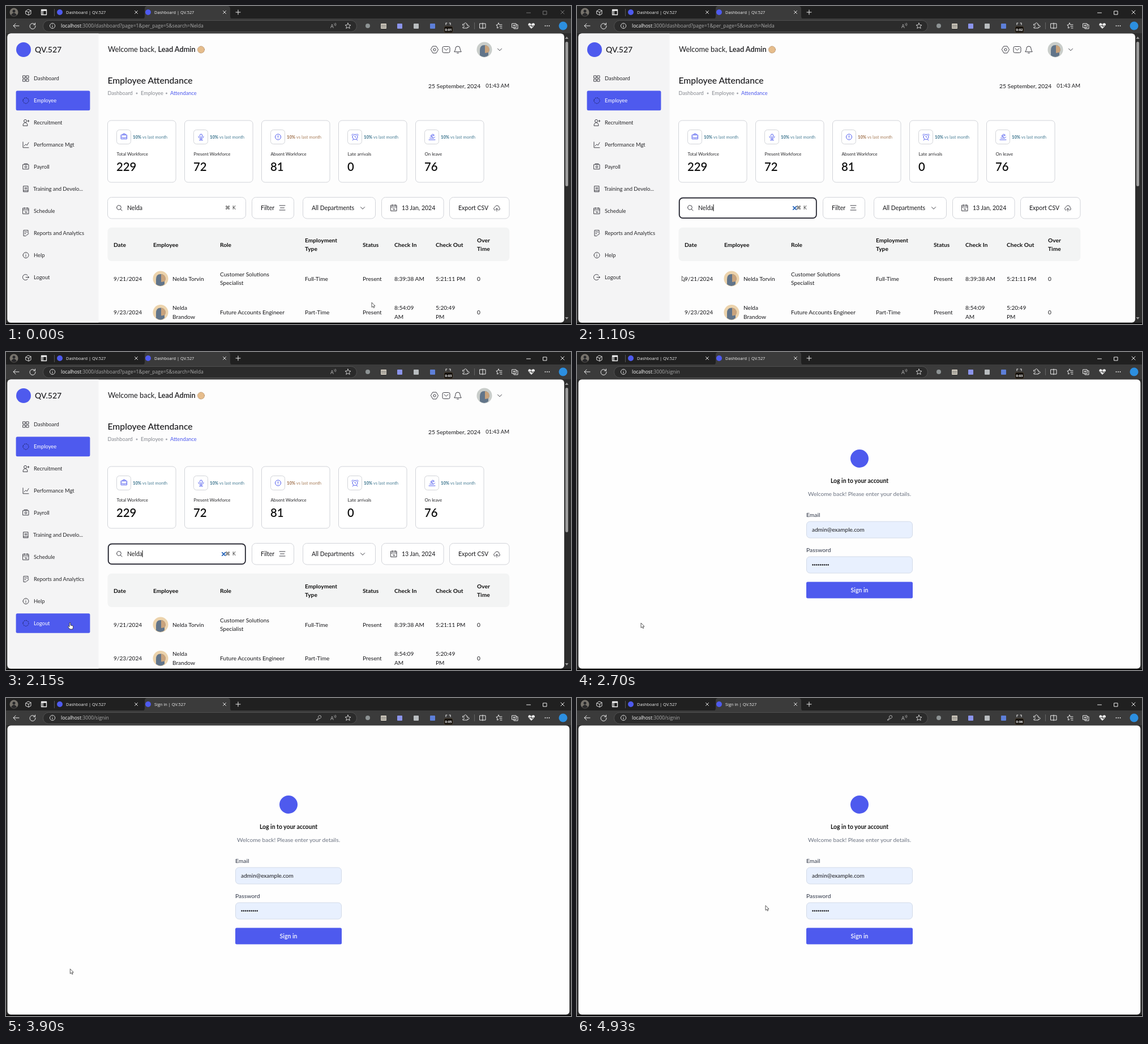
These frames come from a looping animation (998 by 561 pixels, 5.03 s). An HTML page:

```html
<!DOCTYPE html>
<html lang="en">
<head>
<meta charset="utf-8">
<title>Dashboard</title>
<style>
  html, body { margin: 0; width: 100%; height: 100%; overflow: hidden; background: #1c1c1c; }
  svg { display: block; width: 100vw; height: 100vh; font-family: Lato, Inter, sans-serif; }
  text { white-space: pre; }
  .ui { font-family: "Open Sans", "Noto Sans", sans-serif; }
</style>
</head>
<body>
<svg id="stage" viewBox="0 0 998 561"></svg>
<script>
const BLUE = '#4e5aee', INK = '#18181b', LINE = '#d2d4d9';
const LOOP = 5030;

// Drawing helpers: all return SVG markup.
const text = (x, y, s, size = 10.1, fill = INK, weight = 400, more = '') => {
  const lines = s.split('\n');
  return lines.map((line, i) =>
    `<text x="${x}" y="${y + size * .35 + (i - (lines.length - 1) / 2) * 15.5}" font-size="${size}" fill="${fill}" font-weight="${weight}" ${more}>${line}</text>`).join('');
};
const ui = (x, y, s, size, fill, more = '') => text(x, y, s, size, fill, 400, `class="ui" ${more}`);
const rect = (x, y, w, h, r, fill, stroke = 'none', more = '') =>
  `<rect x="${x}" y="${y}" width="${w}" height="${h}" rx="${r}" fill="${fill}" stroke="${stroke}" ${more}/>`;
const dot = (x, y, r, fill, more = '') => `<circle cx="${x}" cy="${y}" r="${r}" fill="${fill}" ${more}/>`;
const icon = (x, y, d, stroke = '#3f3f46', width = 1, more = '') =>
  `<path transform="translate(${x} ${y})" d="${d}" fill="none" stroke="${stroke}" stroke-width="${width}" stroke-linecap="round" stroke-linejoin="round" ${more}/>`;
const group = (id, body) => `<g id="${id}">${body}</g>`;

const ring = r => `M${-r} 0a${r} ${r} 0 1 0 ${2 * r} 0a${r} ${r} 0 1 0 ${-2 * r} 0`;
const box = (w, h = w) => `M${-w} ${-h}h${2 * w}v${2 * h}h${-2 * w}z`;
const CROSS = 'M-2.5 -2.5L2.5 2.5M2.5 -2.5L-2.5 2.5';
const CHEVRON = 'M-3.5 -1.8L0 1.8L3.5 -1.8';
const STAR = 'M0 -5L1.5 -1.6L5 -1.3L2.3 1L3.2 4.5L0 2.6L-3.2 4.5L-2.3 1L-5 -1.3L-1.5 -1.6z';
const CALENDAR = box(5) + 'M-5 -2H5M-2.5 -6v2M2.5 -6v2M-1.5 1h1v2M1.5 1v2';

// Browser frame
const tabText = 'Dashboard | QV.527';
const tab = (x, id) => dot(x + 5, 11, 5, BLUE) +
  ui(x + 16, 11, tabText, 7.4, '#f0f0f0', `id="${id}"`) + icon(x + 140, 11, CROSS, '#e4e4e4');

const chrome = rect(0, 0, 998, 561, 0, '#202020') +
  `<path d="M240 23q5 0 5-5V5q0-5 5-5h141q5 0 5 5v13q0 5 5 5z" fill="#3b3b3b"/>` +
  rect(0, 22, 998, 27, 0, '#3b3b3b') + rect(0, 48, 998, 511, 0, '#2c2c2c') + rect(0, 559, 998, 2, 0, '#050505') +
  dot(14, 11, 7.5, '#77736c') + dot(14, 9, 2.5, '#28282a') + `<path d="M9 16q5-8 10 0a7.5 7.5 0 0 1-10 0" fill="#28282a"/>` +
  icon(40, 11, 'M-5 -2L-1 -5L4 -3V3L0 5L-5 3zM-5 -2L0 0L4 -3M0 0V5', '#ddd') +
  icon(67, 11, box(4.5) + 'M-4.5 -3H4.5M-2 -3V4', '#eee', 1.3) +
  rect(85, 5, 1, 13, 0, '#555') + tab(90, 'tab1') + tab(246, 'tab2') +
  icon(410, 11, 'M-4 0H4M0 -4V4', '#eee') +
  group('controls', icon(923, 12, 'M-3.5 0H3.5', 'currentColor') + icon(952, 12, box(3), 'currentColor') +
    icon(983, 11, 'M-3 -3L3 3M3 -3L-3 3', 'currentColor')) +
  icon(18, 35, 'M5 0H-5L-1 -4M-5 0L-1 4', '#eee') +
  icon(47, 35, 'M3.5 -3A5 5 0 1 0 5 0M4.5 -5V-2H1.5', '#eee') +
  rect(65.5, 25.5, 554, 20, 10, '#2b2b2b', '#515151') +
  icon(82, 35, ring(4.6) + 'M0 0v2.5M0 -2.2v.2', '#ddd') +
  `<text class="ui" x="97" y="38.2" font-size="8.6" fill="#a9a9a9"><tspan fill="#fff">localhost</tspan><tspan id="path"></tspan></text>` +
  group('key', icon(552, 35, 'M0 0L-4 4H-2L1.4 1.2M-.5 -1a2.6 2.6 0 1 1 2 2', '#bbb')) +
  ui(573, 36, 'A', 9, '#bbb') + icon(580, 32, 'M0 -1q1 1 0 3M2 -2q2 2 0 5', '#bbb', .8) +
  icon(604, 35, STAR, '#ccc') +
  dot(639, 35, 4, '#8d9394') +
  rect(662, 31, 10, 9, 1, '#d8d2c5') + icon(667, 35, 'M-4 -1H4M-4 2H4', '#555') +
  rect(691, 31, 9, 9, 1, '#8b94ec') + rect(720, 31, 9, 9, 1, '#b9bdc0') + rect(749, 31, 9, 9, 1, '#5d7fd8') +
  icon(781, 34, 'M-4 -1V-4H-2M2 -4H4V-1', '#ddd', 1.2) + rect(774, 36, 15, 11, 2, '#15120f', '#5f5038', 'stroke-width=".6"') +
  text(781.5, 41.5, '', 6, '#fff', 700, 'id="timer" class="ui" text-anchor="middle"') +
  icon(811, 35, 'M-4 -3H-1a1.7 1.7 0 1 1 3 0H4V0a1.7 1.7 0 1 1 0 2V4H-4V2a1.7 1.7 0 1 0 0-3z', '#ddd') +
  rect(827, 29, 1, 12, 0, '#666') +
  icon(842, 35, box(5, 4) + 'M0 -5V5', '#eee') +
  icon(871, 35, 'M-1 -5L.5 -2H5M-1 -5L-2.3 -2L-5 -1.5L-3 1L-3.5 4L-1 3M1 1H5M2 4H5', '#eee') +
  icon(899, 35, 'M-5 -4H2V3H-5zM-2 3V5H5V-2H2M-1.5 -2V1M-3 -.5H0', '#eee') +
  `<path d="M928 40l-5-5q-2-4 2-5l3 2 3-2q5 1 2 5z" fill="#eee"/>` + icon(928, 35, 'M-5 0H-1L0 -2L1 2L2 0H5', '#333', .9) +
  [952.5, 956, 959.5].map(x => dot(x, 35, .9, '#eee')).join('') + dot(984, 35, 7.5, '#2c8fe0');

// Dashboard page
const menu = [
  ['Dashboard', 'M-5 -5h4v4h-4zM1 -5h4v4h-4zM-5 1h4v4h-4zM1 1h4v4h-4z'],
  ['Employee', ring(5) + ring(2)],
  ['Recruitment', 'M-5 5q0-5 4-5t4 5zM-3.5 -3a2.4 2.4 0 1 0 5 0a2.4 2.4 0 1 0-5 0M3 -3H6M4.5 -4.5V-1.5'],
  ['Performance Mgt', 'M-5 -5V5H5M-3 2L0 -1L2 1L5 -4'],
  ['Payroll', box(5, 4) + 'M-3 -5.5H3' + ring(1.7)],
  ['Training and Develo...', box(4, 5) + 'M-2 -2H2M-2 0H2M-4 3H4'],
  ['Schedule', CALENDAR],
  ['Reports and Analytics', 'M4 0V-5H-4V5H0M-2 -2H2M-2 1H0M1 4L5 1'],
  ['Help', ring(5) + 'M0 0V2.5M0 -2.3V-2'],
  ['Logout', 'M3 -3.5A5 5 0 1 0 3 3.5M0 0H5.5L4 -1.5M5.5 0L4 1.5']
];
const menuItem = ([label, d], i, active) => {
  const y = 128 + 38.95 * i;
  return (active ? rect(17.6, y - 17.4, 130.8, 34.7, 2.5, BLUE) : '') +
    icon(35, y, active ? ring(5) : d, active ? '#1b225e' : '#3f3f46', 1, active ? 'stroke-dasharray="1.5 2"' : '') +
    text(i === 5 ? 48 : 49, y, label, 9.4, active ? '#fff' : '#27272a');
};

const cards = [
  ['Total Workforce', 229, box(5, 3.5) + 'M-2 -3.5V-5.5H2V-3.5M-5 0Q0 3 5 0'],
  ['Present Workforce', 72, 'M-2 -3a2 2 0 1 1 4 0v2a2 2 0 1 1-4 0zM-4.5 -1Q-4 3 0 3T4.5 -1M0 3V5.5M-3 5.5H3'],
  ['Absent Workforce', 81, ring(5) + 'M0 -2.5V.5M0 2.4V2.5'],
  ['Late arrivals', 0, ring(4.5) + 'M0 -2V0L1.5 1M-6 -3L-3.5 -5.5M6 -3L3.5 -5.5M-3 4L-4 6M3 4L4 6'],
  ['On leave', 76, 'M-5.5 5H5.5M-4 2H3L5 0M-1 -1L2 2M-2 -2Q1 -7 4 -3L-2 -1z']
];
const card = ([label, value, d], i) => {
  const x = 180 + 136 * i, tint = i === 2 ? '#9a6840' : '#2d6a85';
  return rect(x - .5, 202, 120.5, 109, 6, '#fff', LINE) + rect(x + 15.5, 218.5, 25, 25, 5, '#fff', LINE) +
    icon(x + 28.5, 231, d, BLUE) +
    text(x + 44, 231, `<tspan font-weight="700">10%</tspan><tspan fill-opacity=".85"> vs last month</tspan>`, 7.6, tint) +
    text(x + 15.5, 261, label, 7.9, '#27272a') + text(x + 15, 283.5, String(value), 20.3, '#111', 600);
};

const avatar = (x, y, back) => dot(x, y, 13.5, back) +
  `<path d="M${x - 8} ${y + 10}v-9q0-9 8-9t9 9l-2 4v5q-7 6-15 0z" fill="#62758a"/>` +
  `<path d="M${x + 1} ${y - 8}q8 1 8 9l-2 4-6 1z" fill="#c9a37c"/>`;

const columns = [190, 260, 378, 528, 630, 686, 759, 832];
const heads = ['Date', 'Employee', 'Role', 'Employment\nType', 'Status', 'Check In', 'Check Out', 'Over\nTime'];
const rows = [
  ['9/21/2024', 'Nelda Torvin', 'Customer Solutions\nSpecialist', 'Full-Time', 'Present', '8:39:38 AM', '5:21:11 PM', '0'],
  ['9/23/2024', 'Nelda\nBrandow', 'Future Accounts Engineer', 'Part-Time', 'Present', '8:54:09\nAM', '5:20:49\nPM', '0']
];
const tableRow = (cells, i) => avatar(273, 481 + 59.5 * i, '#ecd3ac') +
  cells.map((s, c) => text(c === 1 ? 294 : columns[c], 481 + 59.5 * i, s)).join('');

const button = (x, w, label, tx) => rect(x + .5, 337.5, w, 37.5, 7, '#fff', LINE) + text(tx, 356.5, label, 10.5);

const dashboard =
  rect(2.5, 48.4, 983.5, 510, 6, '#fdfdfd') +
  `<path d="M163.5 48.4H8.5q-6 0-6 6v498q0 6 6 6h155z" fill="#f4f4f5"/>` +
  rect(988, 63, 5, 255, 2.5, '#9c9c9c') +
  `<path d="M987.5 58l3-4 3 4zM987.5 549l3 4 3-4z" fill="#9c9c9c"/>` +
  dot(31, 77, 13, BLUE) + text(51, 77, 'QV.527', 14, INK, 500) +
  menu.map((m, i) => menuItem(m, i, i === 1)).join('') +
  group('hover', menuItem(menu[9], 9, true)) +
  text(180, 77, 'Welcome back, <tspan font-weight="600">Lead Admin</tspan>', 12.8) +
  dot(344.5, 77, 6, '#e6bd8c', 'stroke="#a3774b" stroke-dasharray="1.5 1"') +
  icon(757, 77, 'M-3 -6H3L6.5 0L3 6H-3L-6.5 0z' + ring(2.2)) +
  rect(771, 71.5, 13, 11, 2.5, 'none', '#3f3f46') + icon(777.5, 77, 'M-3.5 -2L0 1L3.5 -2') +
  icon(798, 77, 'M-6 3.5Q-4 1 -4 -2Q-4 -6 0 -6T4 -2Q4 1 6 3.5zM-1.5 6H1.5') +
  avatar(845, 77, '#c9cdca') + icon(872, 77, CHEVRON) +
  text(179.5, 132, 'Employee Attendance', 15.7, INK, 500) +
  text(179.5, 154, 'Dashboard', 9.3, '#85888f') + dot(231, 154, 1.5, '#a3a6ad') +
  text(238, 154, 'Employee', 9.3, '#85888f') + dot(283.5, 154, 1.5, '#a3a6ad') +
  text(290, 154, 'Attendance', 9.3, BLUE) +
  text(746, 141, '25 September, 2024', 10.3) + text(889, 141, '01:43 AM', 9.5, INK, 400, 'text-anchor="end"') +
  cards.map(card).join('') +
  button(179, 244, 'Nelda', 214) + icon(199.5, 355.5, ring(3.8) + 'M2.8 2.8L5.5 5.5') +
  group('focus', rect(180.8, 338.7, 242, 35.5, 6, 'none', '#22222c', 'stroke-width="1.7"') +
    icon(384.5, 356.5, 'M-2.7 -2.7L2.7 2.7M2.7 -2.7L-2.7 2.7', '#2463b8', 1.8)) +
  group('caret', rect(240.5, 350, 1, 12, 0, '#111')) +
  text(387, 356, '⌘', 9, '#333', 400, 'font-family="DejaVu Sans, sans-serif"') + text(400, 356, 'K', 8.6, '#333') +
  button(434, 74, 'Filter', 450) + icon(488, 356, 'M-5 -4H5M-3.5 0H3.5M-5 4H5') +
  button(524, 128, 'All Departments', 540) + icon(630, 356.5, CHEVRON) +
  button(663, 109.5, '13 Jan, 2024', 699) + icon(685, 356.5, CALENDAR) +
  button(783, 105.5, 'Export CSV', 799) + icon(867, 357, 'M-3 3H-4Q-7 0 -3.5 -2Q-2 -6 2 -4.5Q4 -4 4 -1.5Q7 1 4 3H3M0 5V0L-2 2M0 0L2 2') +
  rect(179.5, 390.7, 709.8, 59.3, 7, '#f3f4f4') +
  heads.map((s, i) => text(columns[i], 421, s, 10.2, '#111', 700)).join('') +
  rows.map(tableRow).join('');

// Sign-in page
const field = (y, label) => text(405, y, label, 10.3, '#3b4252', 500) + rect(405.5, y + 12, 187, 29, 6, '#e8f0fe', '#d3dbe9');
const signin =
  rect(2.5, 48.4, 992.8, 510, 6, '#fefefe') + dot(499, 188, 16, BLUE) +
  text(499, 227, 'Log in to your account', 10.4, '#111', 700, 'text-anchor="middle"') +
  text(499, 250.5, 'Welcome back! Please enter your details.', 10.2, '#6b7280', 400, 'text-anchor="middle"') +
  field(287, 'Email') + text(415, 313.5, 'admin@example.com', 10) +
  field(349, 'Password') + [...Array(9)].map((_, i) => dot(416.5 + 3.4 * i, 375.5, 1.25, INK)).join('') +
  rect(405, 405.5, 188, 29, 2.5, BLUE) +
  text(499, 420.5, 'Sign in', 10.5, '#fff', 600, 'text-anchor="middle"');

const pointer = group('cursor',
  `<path id="arrow" d="M0 0V8.5L2 6.8L3.4 9.6L4.8 9L3.5 6.2H6z" fill="#fff" stroke="#333" stroke-width=".8"/>` +
  `<path id="hand" d="M-1 0q1-1.2 2 0v4l4 1q1 .5 .6 2.5l-.8 3.5h-5l-3.6-4.5q.5-1.5 1.8-.5l1 .8z" fill="#fff" stroke="#222" stroke-width=".8"/>`);

const stage = document.getElementById('stage');
stage.innerHTML = chrome + group('dashboard', dashboard) + group('signin', signin) + pointer;

// Motion
const el = id => document.getElementById(id);
const show = (id, on) => el(id).setAttribute('display', on ? 'inline' : 'none');
const FOCUS = 100, LEAVE = 2660;
const track = [
  [0, 646, 523], [99, 646, 523], [100, 322, 358], [310, 322, 358], [690, 288, 469], [790, 278, 473],
  [890, 262, 475], [1300, 113, 478], [3900, 113, 478], [4420, 270, 396], [4490, 276, 393], [4690, 333, 366], [LOOP, 333, 366]
];
function cursorAt(t) {
  const i = track.findIndex(k => k[0] > t);
  const [t0, x0, y0] = track[i - 1], [t1, x1, y1] = track[i];
  const p = (t - t0) / (t1 - t0);
  return [x0 + (x1 - x0) * p, y0 + (y1 - y0) * p];
}

function draw(t) {
  const home = t < LEAVE, [x, y] = cursorAt(t);
  const over = home && x > 18 && x < 148 && y > 461 && y < 495;
  show('dashboard', home);
  show('signin', !home);
  show('focus', t >= FOCUS);
  show('caret', t >= FOCUS && Math.floor((t - 2150) / 530) % 2 === 0);
  show('hover', over);
  show('hand', over);
  show('arrow', !over);
  show('key', t >= 3210);
  el('cursor').setAttribute('transform', `translate(${x} ${y})`);
  el('controls').style.color = t < FOCUS ? '#777' : '#eee';
  el('path').textContent = home ? ':3000/dashboard?page=1&per_page=5&search=Nelda' : ':3000/signin';
  el('tab2').textContent = t < 2900 ? tabText : 'Sign in | QV.527';
  el('timer').textContent = '0:0' + (1 + [900, 1910, 2900, 3900, 4900].filter(s => t >= s).length);
}

const start = performance.now();
function tick() {
  draw((performance.now() - start) % LOOP);
  requestAnimationFrame(tick);
}
tick();
</script>
</body>
</html>
```
